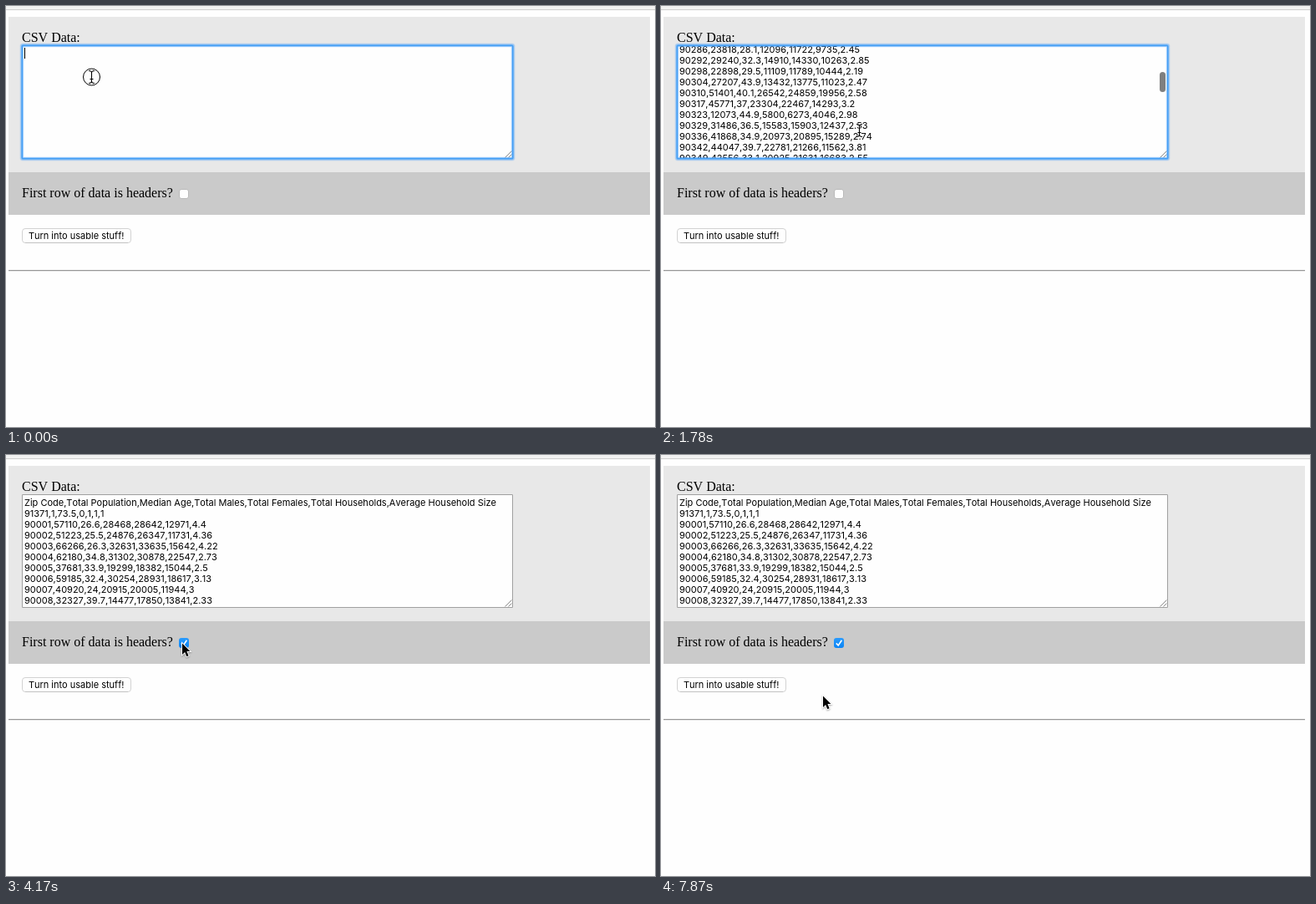
Animation, 777 px wide and 504 px high, one loop 8000 ms. Source, as an HTML page with a canvas:

```html
<!DOCTYPE html>
<html lang="en">
<head>
<meta charset="utf-8">
<title>CSV form</title>
<style>
html, body { margin: 0; width: 100%; height: 100%; overflow: hidden; background: #fefefe; }
canvas { display: block; }
</style>
</head>
<body>
<canvas id="stage" width="777" height="504"></canvas>
<script>
const ctx = document.getElementById('stage').getContext('2d');
const LOOP = 8000, STEP = 148.5;
const SANS = '11px Inter, "Liberation Sans", sans-serif';
const SERIF = '16px "Liberation Serif", "Times New Roman", serif';
const LINE = 13, ROWS = 320, MAX_SCROLL = 4043;

// Events, counted in screen updates.
const PASTE = 3, CARET_OFF = 6, BOUNCE = 14, FADE = 24, CHECK = 27, PRESS = 46;

const firstRows = `Zip Code,Total Population,Median Age,Total Males,Total Females,Total Households,Average Household Size
91371,1,73.5,0,1,1,1
90001,57110,26.6,28468,28642,12971,4.4
90002,51223,25.5,24876,26347,11731,4.36
90003,66266,26.3,32631,33635,15642,4.22
90004,62180,34.8,31302,30878,22547,2.73
90005,37681,33.9,19299,18382,15044,2.5
90006,59185,32.4,30254,28931,18617,3.13
90007,40920,24,20915,20005,11944,3
90008,32327,39.7,14477,17850,13841,2.33`.split('\n');

const rand = n => {
  const v = Math.sin(n * 12.9898) * 43758.5453;
  return v - Math.floor(v);
};

// Zip codes thin out towards the end of the list.
function makeRow(_, i) {
  if (i < firstRows.length) return firstRows[i];
  const j = i - firstRows.length + 1;
  const zip = Math.round(90008 + 1.3 * j + 0.031 * j * j);
  const people = Math.round(5000 + rand(i) * 50000);
  const men = Math.round(people * (0.47 + rand(i + 400) * 0.05));
  const size = 1.8 + rand(i + 800) * 2.2;
  const age = 28 + rand(i + 1200) * 17;
  return [zip, people, +age.toFixed(1), men, people - men, Math.round(people / size), +size.toFixed(2)].join();
}
const rows = Array.from({ length: ROWS }, makeRow);

// Each leg is [start, end, ...values]; between legs the value rests.
const easeOut = u => Math.sin(u * Math.PI / 2);
const linear = u => u;

function follow(from, legs, k, ease) {
  let at = from;
  for (const [start, end, ...to] of legs) {
    if (k <= start) break;
    const u = ease(Math.min(1, (k - start) / (end - start)));
    at = at.map((v, i) => v + (to[i] - v) * u);
  }
  return at.map(Math.round);
}

const pointerLegs = [
  [5, 7, 237, 149],
  [15, 19, 53, 61],
  [19, 22, 129, 219],
  [22, 26, 211, 225],
  [30, 33, 174, 82],
  [33, 35, 236, 68],
  [35, 39, 441, 49],
  [39, 44, 68, 274],
  [48, 53, 194, 288]
];
const scrollLegs = [[8, 9, 3009], [9, 12, 1110], [12, 14, 0]];

function rect(x, y, w, h, color) {
  ctx.fillStyle = color;
  ctx.fillRect(x, y, w, h);
}

function round(x, y, w, h, r, fill, stroke, width = 1) {
  ctx.beginPath();
  ctx.roundRect(x, y, w, h, r);
  if (fill) { ctx.fillStyle = fill; ctx.fill(); }
  if (stroke) { ctx.strokeStyle = stroke; ctx.lineWidth = width; ctx.stroke(); }
}

function stroke(path, color, width) {
  ctx.strokeStyle = color;
  ctx.lineWidth = width;
  ctx.stroke(new Path2D(path));
}

function text(str, x, y, font, color = '#000') {
  ctx.font = font;
  ctx.fontKerning = font === SANS ? 'none' : 'auto';
  ctx.fillStyle = color;
  ctx.fillText(str, x, y);
}

function shade(y, h, top, bottom) {
  const g = ctx.createLinearGradient(0, y, 0, y + h);
  g.addColorStop(0, top);
  g.addColorStop(1, bottom);
  return g;
}

function drawRows(scroll) {
  const first = Math.floor(scroll / LINE);
  rows.slice(first, first + 12).forEach((row, i) => {
    text(row, 22, 61 + (first + i) * LINE - scroll, SANS);
  });
}

function drawTextarea(k) {
  const [scroll] = follow([MAX_SCROLL], scrollLegs, k, linear);
  const focused = k < CHECK;
  rect(19, 47, 588, 136, '#fefefe');
  if (!focused) round(19.5, 47.5, 587, 135, 0, null, '#a0a0a0');

  ctx.save();
  ctx.beginPath();
  ctx.rect(20, 48, 586, 134);
  ctx.clip();
  if (k >= PASTE) drawRows(scroll);
  if (k < CARET_OFF) rect(22, k < PASTE ? 50 : 167, 1, 13, '#000');
  stroke('M597.5 181.5L605.5 173.5M601.5 181.5L605.5 177.5', '#8a8a8a', 1);
  if (k >= PASTE && k <= FADE) {
    ctx.globalAlpha = k < FADE ? 1 : 0.5;
    round(597, 50 + scroll / MAX_SCROLL * 106, 7, 24, 3.5, '#7f7f7f');
  }
  ctx.restore();

  if (focused) {
    round(19, 47, 588, 136, 1, null, 'rgba(59,153,252,.16)', 5);
    round(19, 47, 588, 136, 1, null, 'rgba(59,153,252,.35)', 3.4);
    round(19.3, 47.3, 587.4, 135.4, 1, null, '#459ff5', 1.7);
  }
}

function drawCheckbox(k) {
  if (k > CHECK) {
    round(207, 219, 12, 12, 3, shade(219, 12, '#2a9bfc', '#0a84f5'));
    stroke('M209.8 225.4L212.2 228L216.4 221.8', '#fff', 1.6);
  } else {
    round(207.5, 219.5, 11, 11, 2.5, k === CHECK ? '#e2e2e2' : '#fefefe', '#bababa');
  }
}

function drawButton(down) {
  const face = down ? shade(266, 18, '#5aaefb', '#0b6efc') : '#fefefe';
  round(19.5, 266.5, 130, 17, 3.5, face, down ? '#2c82ee' : '#d2d2d2');
  if (!down) stroke('M23 283.5H146', '#c2c2c2', 1);
  text('Turn into usable stuff!', 27, 279, SANS, down ? '#fff' : '#000');
}

function drawClick(x, y) {
  round(x - 9.5, y - 10, 20, 20, 10, 'rgba(255,255,255,.3)', '#000');
}

function drawBeam() {
  const beam = 'M-3 -7.5Q.5 -7.5 .5 -5V5Q.5 7.5 -3 7.5M4 -7.5Q.5 -7.5 .5 -5M.5 5Q.5 7.5 4 7.5M-1.5 2.5H2.5';
  stroke(beam, 'rgba(255,255,255,.6)', 2.4);
  stroke(beam, '#000', 1.1);
}

function drawArrow() {
  const arrow = 'M0 .5V14L3.1 11L5.3 16.2L7.6 15.2L5.4 10.1H9.4Z';
  ctx.shadowColor = 'rgba(0,0,0,.35)';
  ctx.shadowBlur = 2;
  ctx.shadowOffsetY = 1;
  stroke(arrow, '#fff', 1.8);
  ctx.shadowColor = 'transparent';
  ctx.fillStyle = '#000';
  ctx.fill(new Path2D(arrow));
}

function drawPointer(k) {
  const [x, y] = follow([102, 85], pointerLegs, k, easeOut);
  const overText = x > 19 && x < 607 && y > 47 && y < 183;
  if (k === 0 || k === CHECK || k === PRESS) drawClick(x, y);
  ctx.save();
  ctx.translate(x, y);
  if (overText) drawBeam(); else drawArrow();
  ctx.restore();
}

function draw(t) {
  const k = Math.min(53, Math.floor((t + 9) / STEP));
  rect(0, 0, 777, 504, '#fefefe');
  rect(0, 0, 777, 4, '#f2f2f2');
  rect(0, 4, 777, 1, '#cecece');

  // The page overshoots briefly when the list reaches its top.
  ctx.save();
  ctx.translate(0, k < BOUNCE ? 0 : Math.max(0, 2 - (k - BOUNCE)));
  rect(3, 13, 768, 186, '#e8e8e8');
  rect(3, 199, 768, 51, '#cacaca');
  text('CSV Data:', 19, 43, SERIF);
  text('First row of data is headers?', 19, 229, SERIF);
  drawTextarea(k);
  drawCheckbox(k);
  drawButton(k === PRESS);
  rect(3, 316, 768, 1, '#979797');
  rect(3, 317, 768, 1, '#e4e4e4');
  ctx.restore();

  drawPointer(k);
}

function tick() {
  draw(performance.now() % LOOP);
  requestAnimationFrame(tick);
}
tick();
</script>
</body>
</html>
```
